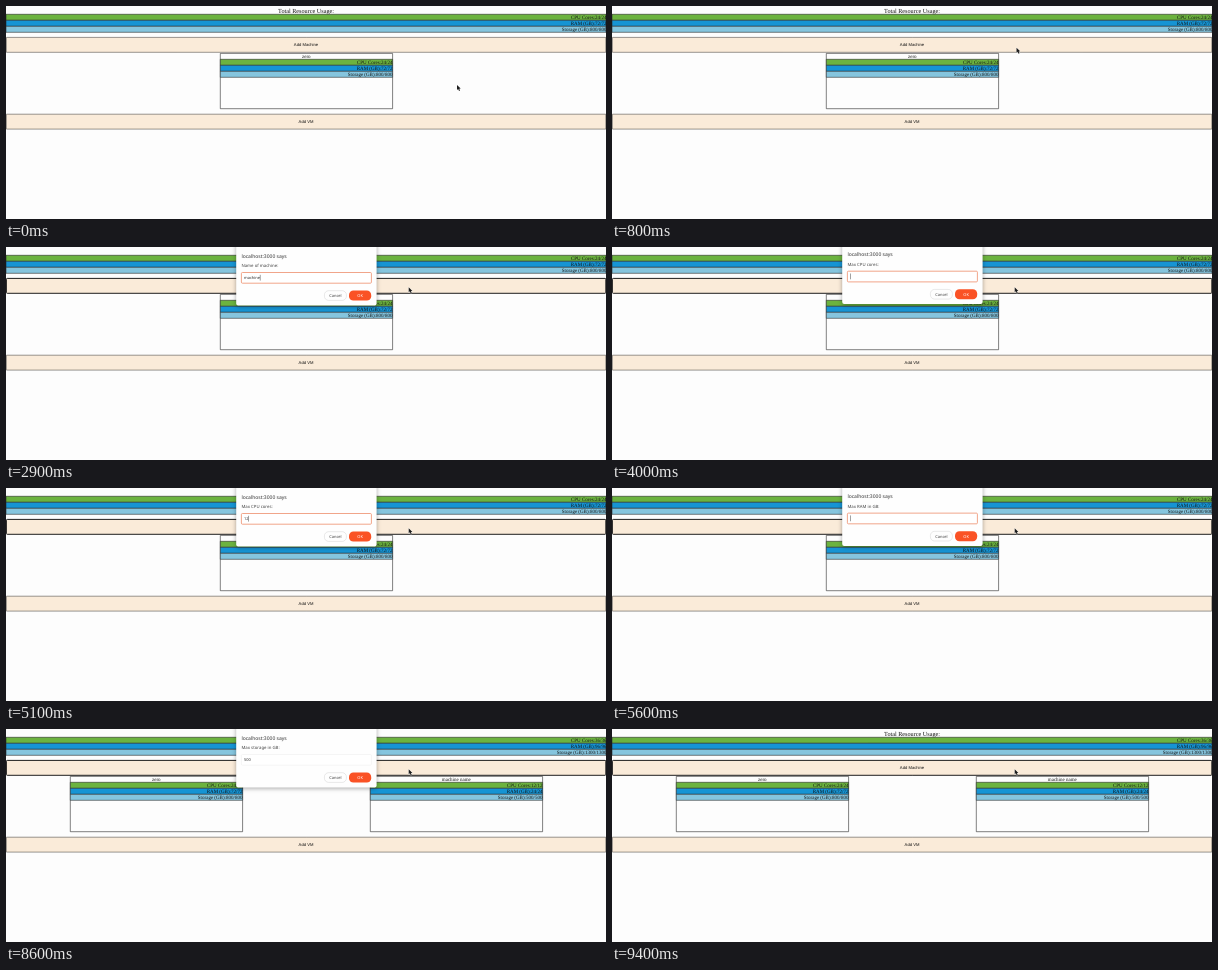
These frames come from a looping animation (600 by 213 pixels, 9500 ms). An HTML page with a canvas:

```html
<!DOCTYPE html>
<html lang="en">
<head>
<meta charset="utf-8">
<title>Resource usage</title>
<style>
  html, body { margin: 0; width: 100%; height: 100%; overflow: hidden; background: #fdfdfd; }
  canvas { display: block; width: 600px; height: 213px; }
</style>
</head>
<body>
<canvas id="stage"></canvas>
<script>
const W = 600, H = 213, LOOP = 9500;
const SERIF = '"Liberation Serif", serif';
const ARIAL = '"Liberation Sans", sans-serif';
const UI = '"Noto Sans", sans-serif';
const LINE = '#2a2a2a';
const BAR_COLORS = ['#6cb33f', '#1694d4', '#85c5de'];

const canvas = document.getElementById('stage');
const ctx = canvas.getContext('2d');
const dpr = window.devicePixelRatio || 1;
canvas.width = W * dpr;
canvas.height = H * dpr;

// Each prompt: opening time, label, typed text and the time of every key.
const PROMPTS = [
  { at: 980, label: 'Name of machine:', text: 'machine name',
    keys: [1900, 2000, 2200, 2500, 2700, 2800, 2900, 3000, 3100, 3300, 3400, 3500] },
  { at: 3895, label: 'Max CPU cores:', text: '12', keys: [5100, 5100] },
  { at: 5460, label: 'Max RAM in GB:', text: '24', keys: [6200, 6400] },
  { at: 6895, label: 'Max storage in GB:', text: '500', keys: [7700, 7900, 8000] }
];
const SUBMIT = 8300, ADDED = 8500, CLOSED = 8700;

const clamp = v => Math.max(0, Math.min(1, v));
const smooth = v => v * v * (3 - 2 * v);

function text(str, x, y, size, family, align = 'left', color = '#111') {
  ctx.font = `${size}px ${family}`;
  ctx.textAlign = align;
  ctx.fillStyle = color;
  ctx.fillText(str, x, y);
}

function box(x, y, w, h, fill, stroke, width = 0.6, radius = 0) {
  ctx.beginPath();
  ctx.roundRect(x, y, w, h, radius);
  if (fill) {
    ctx.fillStyle = fill;
    ctx.fill();
  }
  if (stroke) {
    ctx.strokeStyle = stroke;
    ctx.lineWidth = width;
    ctx.stroke();
  }
}

function bars(x, y, w, [cpu, ram, disk], right) {
  const rows = [`CPU Cores:${cpu}/${cpu}`, `RAM (GB):${ram}/${ram}`, `Storage (GB):${disk}/${disk}`];
  rows.forEach((row, i) => {
    const top = y + i * 6;
    box(x, top, w, 6, BAR_COLORS[i], LINE);
    text(row, right, top + 4.7, 5, SERIF, 'right');
  });
}

function machine(cx, name, values) {
  const x = cx - 86, w = 172.3;
  box(x, 47.4, w, 55.3, '#fdfdfd', LINE);
  text(name, cx, 51.8, 5, SERIF, 'center');
  bars(x, 53.3, w, values, x + w - 0.2);
}

function button(y, label, focused) {
  box(0.4, y, W - 0.6, 14.9, '#faebd9', focused ? '#111' : '#55504a',
    focused ? 0.95 : 0.6, focused ? 0.8 : 0);
  text(label, 300, y + 9, 4.17, ARIAL, 'center');
}

function page(t) {
  const added = t >= ADDED;
  ctx.fillStyle = '#fdfdfd';
  ctx.fillRect(0, 0, W, H);
  text('Total Resource Usage:', 300, 6.6, 6.2, SERIF, 'center');
  bars(0, 8.3, W, added ? [36, 96, 1300] : [24, 72, 800], 600.4);
  button(31.4, 'Add Machine', t >= 950);
  button(108.2, 'Add VM', false);
  machine(added ? 150.3 : 300.3, 'zero', [24, 72, 800]);
  if (added) machine(450.3, 'machine name', [12, 24, 500]);
}

function dialog(t) {
  if (t >= CLOSED) return;
  const p = PROMPTS.filter(q => t >= q.at).pop();
  if (!p) return;
  const focused = t < SUBMIT;
  const count = p.keys.filter(k => t >= k).length;
  const typed = p.text.slice(0, count);
  const lastKey = count ? p.keys[count - 1] : p.at;

  ctx.save();
  ctx.translate(0, -10 * Math.pow(1 - clamp((t - p.at) / 200), 2.7));
  ctx.save();
  ctx.shadowColor = 'rgba(0,0,0,0.35)';
  ctx.shadowBlur = 4 * dpr;
  ctx.shadowOffsetY = dpr;
  box(230.2, -12, 140.4, 70.4, '#fefefe', null, 0, 2);
  ctx.restore();

  text('localhost:3000 says', 235.4, 10.6, 5, UI, 'left', '#333');
  text(p.label, 235.4, 20.4, 4.3, UI, 'left', '#444');
  box(235.4, 25.5, 130, 10.7, '#fff', focused ? '#ee8f6c' : '#f3f3f3', 0.8, 1);
  text(typed, 238, 31.9, 3.95, UI, 'left', '#333');
  if (focused && Math.floor((t - lastKey) / 500) % 2 === 0) {
    const cx = 238 + ctx.measureText(typed).width;
    ctx.fillStyle = '#444';
    ctx.fillRect(cx, 27.8, 0.5, 5.8);
  }
  box(318.4, 43.7, 22, 9.7, '#fefefe', '#d2d2d2', 0.5, 4.2);
  text('Cancel', 329.4, 49.9, 4, UI, 'center', '#444');
  box(343, 43.5, 22.2, 10.1, '#fa5225', null, 0, 4.4);
  text('OK', 354.1, 49.9, 4, UI, 'center', '#fff');
  ctx.restore();
}

function pointer(t) {
  const k = smooth(clamp((t - 50) / 850));
  ctx.save();
  ctx.translate(451 + (402.7 - 451) * k, 79 + (40.3 - 79) * k);
  ctx.beginPath();
  [[0, 0], [0, 5], [1.2, 4], [2, 5.9], [3, 5.5], [2.2, 3.7], [3.7, 3.6]]
    .forEach(([x, y]) => ctx.lineTo(x, y));
  ctx.closePath();
  ctx.strokeStyle = 'rgba(255,255,255,0.8)';
  ctx.lineWidth = 0.7;
  ctx.stroke();
  ctx.fillStyle = '#1c1c1c';
  ctx.fill();
  ctx.restore();
}

function draw(t) {
  ctx.setTransform(dpr, 0, 0, dpr, 0, 0);
  ctx.textRendering = 'geometricPrecision';
  page(t);
  dialog(t);
  pointer(t);
}

const start = performance.now();
function tick() {
  draw((performance.now() - start) % LOOP);
  requestAnimationFrame(tick);
}
tick();
</script>
</body>
</html>
```
